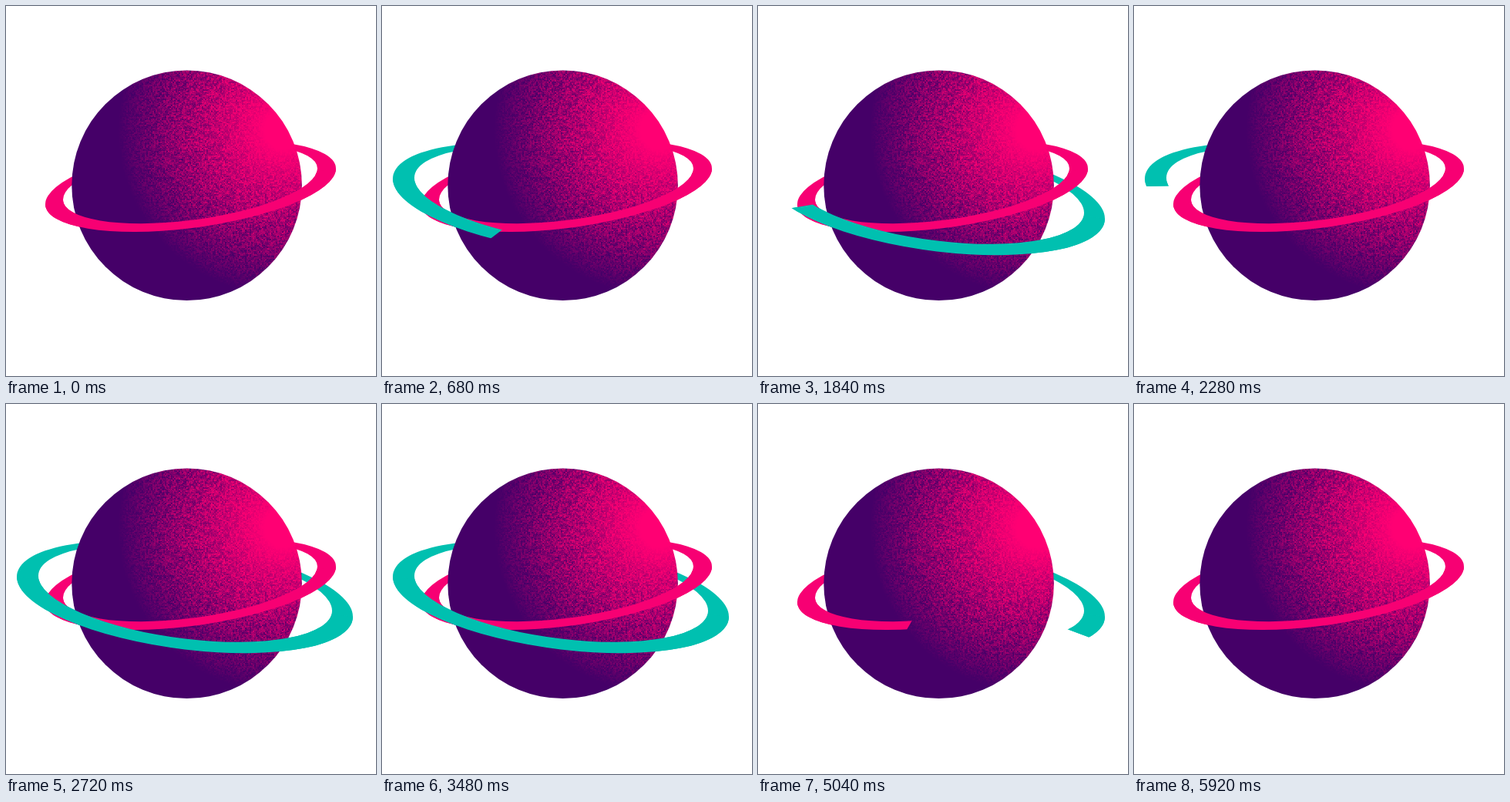
An HTML page with a canvas that plays this animation: 480x480 px, repeating every 6000 ms.

```html
<!DOCTYPE html>
<html lang="en">
<head>
<meta charset="utf-8">
<title>Ringed planet</title>
<style>
  html, body { margin: 0; width: 100%; height: 100%; overflow: hidden; background: #fff; }
  canvas { display: block; width: 480px; height: 480px; }
</style>
</head>
<body>
<canvas id="stage" width="480" height="480"></canvas>
<script>
const SIZE = 480, LOOP = 6000, STEP = 40, SWEEP = 1000;
const DARK = [69, 0, 104], LIGHT = [255, 0, 115];
const ctx = document.getElementById('stage').getContext('2d');

// Each pass is [time the ring starts to grow, time it starts to vanish].
const pink = {
  color: '#f70073', slope: -0.122, pivot: [238, 215],
  outer: { x: 239.5, y: 234, rx: 188.5, ry: 54.3 },
  inner: { x: 239, y: 231, rx: 165, ry: 47 },
  passes: [[-2000, 505], [1000, 3434], [4566, 9000]]
};
const teal = {
  color: '#00c0b0', slope: 0.119, pivot: [235, 230],
  outer: { x: 232, y: 250, rx: 218, ry: 68.5 },
  inner: { x: 232.5, y: 245.6, rx: 190.5, ry: 59 },
  passes: [[225, 1451], [1935, 4419]]
};

const clamp = v => Math.min(1, Math.max(0, v));

function ease(ms) {
  const p = clamp(ms / SWEEP);
  return p * p * (3 - 2 * p);
}

function seeded(seed) {
  return () => {
    seed = (Math.imul(seed, 1664525) + 1013904223) >>> 0;
    return seed / 4294967296;
  };
}

function makeGrain() {
  const layer = document.createElement('canvas');
  layer.width = layer.height = SIZE;
  const c = layer.getContext('2d');
  const image = c.createImageData(SIZE, SIZE);
  const rand = seeded(7);
  const half = SIZE / 2;
  const coarse = Array.from({ length: half * half }, rand);
  for (let y = 0; y < SIZE; y++) {
    for (let x = 0; x < SIZE; x++) {
      const light = clamp((215 - Math.hypot(x - 360, y - 160)) / 190);
      const noise = 0.6 * coarse[(y >> 1) * half + (x >> 1)] + 0.4 * rand() - 0.5;
      // The grain is strongest in the half tones.
      const mix = clamp(light + noise * 3.4 * light * (1 - light));
      const i = (y * SIZE + x) * 4;
      for (let k = 0; k < 3; k++) image.data[i + k] = DARK[k] + (LIGHT[k] - DARK[k]) * mix;
      image.data[i + 3] = 255;
    }
  }
  c.putImageData(image, 0, 0);
  return layer;
}

const grain = makeGrain();

function drawPlanet() {
  ctx.save();
  ctx.beginPath();
  ctx.arc(234.6, 232.8, 149.3, 0, 2 * Math.PI);
  ctx.clip();
  ctx.drawImage(grain, 0, 0);
  ctx.restore();
}

function addEllipse({ x, y, rx, ry }, slope) {
  ctx.save();
  ctx.transform(1, slope, 0, 1, x, y);
  ctx.moveTo(rx, 0);
  ctx.ellipse(0, 0, rx, ry, 0, 0, 2 * Math.PI);
  ctx.restore();
}

// Sector from the back, past the left end, along the front to the right end.
function clipSector({ outer, inner, slope, pivot: [px, py] }, from, to) {
  const mid = key => (outer[key] + inner[key]) / 2;
  const rx = mid('rx'), ry = mid('ry');
  ctx.beginPath();
  ctx.moveTo(px, py);
  for (let i = 0; i <= 60; i++) {
    const a = (from + (to - from) * i / 60 - 0.25) * 2 * Math.PI;
    const dx = -rx * Math.cos(a);
    const x = mid('x') + dx, y = mid('y') + slope * dx + ry * Math.sin(a);
    ctx.lineTo(px + 3 * (x - px), py + 3 * (y - py));
  }
  ctx.closePath();
  ctx.clip();
}

function clipFront({ outer, slope }) {
  const edge = x => outer.y + slope * (x - outer.x);
  ctx.beginPath();
  ctx.moveTo(0, edge(0));
  ctx.lineTo(SIZE, edge(SIZE));
  ctx.lineTo(SIZE, SIZE);
  ctx.lineTo(0, SIZE);
  ctx.clip();
}

function drawRing(ring, time, front) {
  for (const [grow, vanish] of ring.passes) {
    const from = ease(time - vanish), to = ease(time - grow);
    if (to <= from) continue;
    ctx.save();
    if (front) clipFront(ring);
    if (to - from < 1) clipSector(ring, from, to);
    ctx.beginPath();
    addEllipse(ring.outer, ring.slope);
    addEllipse(ring.inner, ring.slope);
    ctx.fillStyle = ring.color;
    ctx.fill('evenodd');
    ctx.restore();
  }
}

function draw(time) {
  ctx.fillStyle = '#fff';
  ctx.fillRect(0, 0, SIZE, SIZE);
  drawRing(teal, time, false);
  drawRing(pink, time, false);
  drawPlanet();
  drawRing(pink, time, true);
  drawRing(teal, time, true);
}

const start = performance.now();

function tick() {
  const time = (performance.now() - start) % LOOP;
  draw(Math.floor(time / STEP) * STEP);
  requestAnimationFrame(tick);
}

tick();
</script>
</body>
</html>
```
